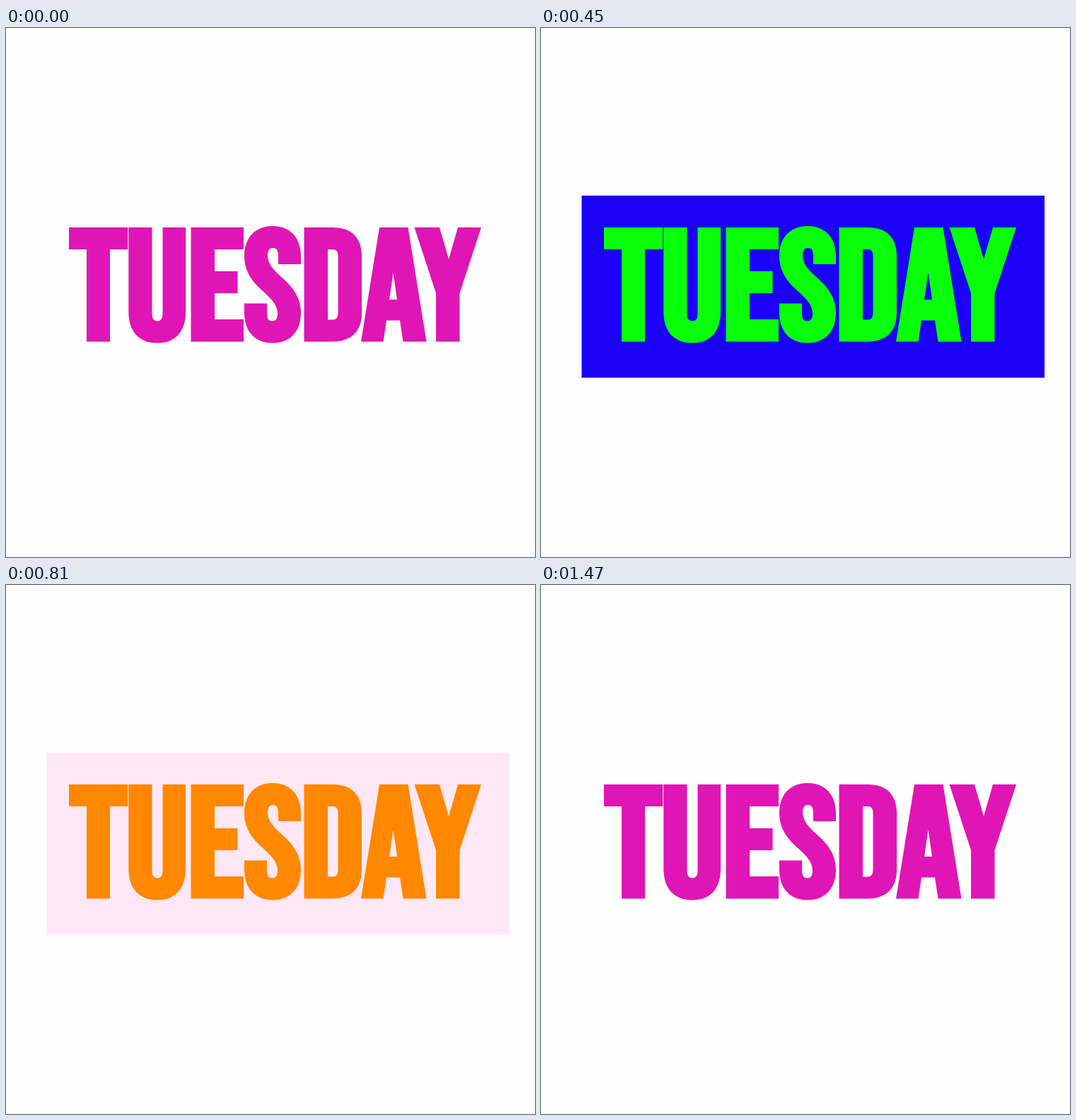
Recreate the animation shown at these times as an HTML page. Size 748 by 748 pixels, loop 1590 ms.

```html
<!DOCTYPE html>
<html lang="en">
<head>
<meta charset="utf-8">
<title>Tuesday</title>
<style>
  html, body { margin: 0; width: 100%; height: 100%; overflow: hidden; background: #fefefe; }
  svg { display: block; width: 100%; height: 100%; }
</style>
</head>
<body>
<svg viewBox="0 0 748 748" role="img" aria-label="TUESDAY">
  <rect id="panel" x="57.5" y="237" width="654.5" height="257.5" fill="#fefefe"/>
  <g id="word" fill="#df16b5" fill-rule="evenodd">
    <path d="M89 282H172.3V313H147V443.5H114V313H89Z"/>
    <path d="M173.3 282H206.5V404Q206.5 414.5 214 414.5T221.5 404V282H254V401C254 430 239 445.5 214 445.5S173.3 430 173.3 401Z"/>
    <path d="M261.5 282H336V313H295V344H327.5V375H295V412H336V443.5H261.5Z"/>
    <path id="ess"/>
    <path d="M421.5 282H462C488 282 503 296 503 322V403C503 429 488 443.5 462 443.5H421.5ZM455 313V412.5H462Q469.5 412.5 469.5 403V322Q469.5 313 462 313Z"/>
    <path d="M528 282H568.5L594.5 443.5H561.5L557 413.5H538L533.5 443.5H502ZM547.5 346L542 384H553Z"/>
    <path d="M577.5 282H613L626 327L639 282H672L641.5 375V443.5H608V375Z"/>
  </g>
</svg>
<script>
  const TICK = 30, FADE = 49 * TICK, LOOP = FADE + 120;
  const $ = id => document.getElementById(id);

  // Half of the S around its centre; the other half is the same turned by 180 degrees.
  const half = (turn, cut) =>
    `40,${-cut} L8,${-cut} L8,-39 C8,-48 6,-51.7 .5,-51.7 C-4.5,-51.7 -7,-48 -7,-41
     C-7,-29 2,-20 13,-10 C28,3 40,18 40,40 C40,66 25,82.7 0,82.7 C-25,82.7 -40,66 -40,40`
      .replace(/([-.\d]+),([-.\d]+)/g, (_, x, y) => `${377 + turn * x},${362.7 + turn * y}`);
  $('ess').setAttribute('d', `M${half(1, 28.7)} L${half(-1, 26.8)}Z`);

  // start time, panel colour, word colour
  const looks = [
    [0, '#fefefe', '#df16b5'],
    [270, '#00e8c3', '#0071f3'],
    [450, '#1b00f7', '#08ff08'],
    [690, '#fa009d', '#ecf500'],
    [810, '#fee8f6', '#ff8800'],
    [1050, '#262626', '#fefefe']
  ];

  const mix = (a, b, p) => `color-mix(in srgb, ${b} ${p * 100}%, ${a})`;

  function draw(ms) {
    const t = Math.min(FADE, Math.floor(ms % LOOP / TICK) * TICK);
    const i = looks.findLastIndex(look => look[0] <= t);
    const [from, panel, word] = looks[i];
    const [to, nextPanel, nextWord] = looks[(i + 1) % looks.length];
    const p = (t - from) / ((to || FADE) - from);
    $('panel').style.fill = mix(panel, nextPanel, p);
    $('word').style.fill = mix(word, nextWord, p);
  }

  const start = performance.now();
  (function loop() {
    draw(performance.now() - start);
    requestAnimationFrame(loop);
  })();
</script>
</body>
</html>
```
